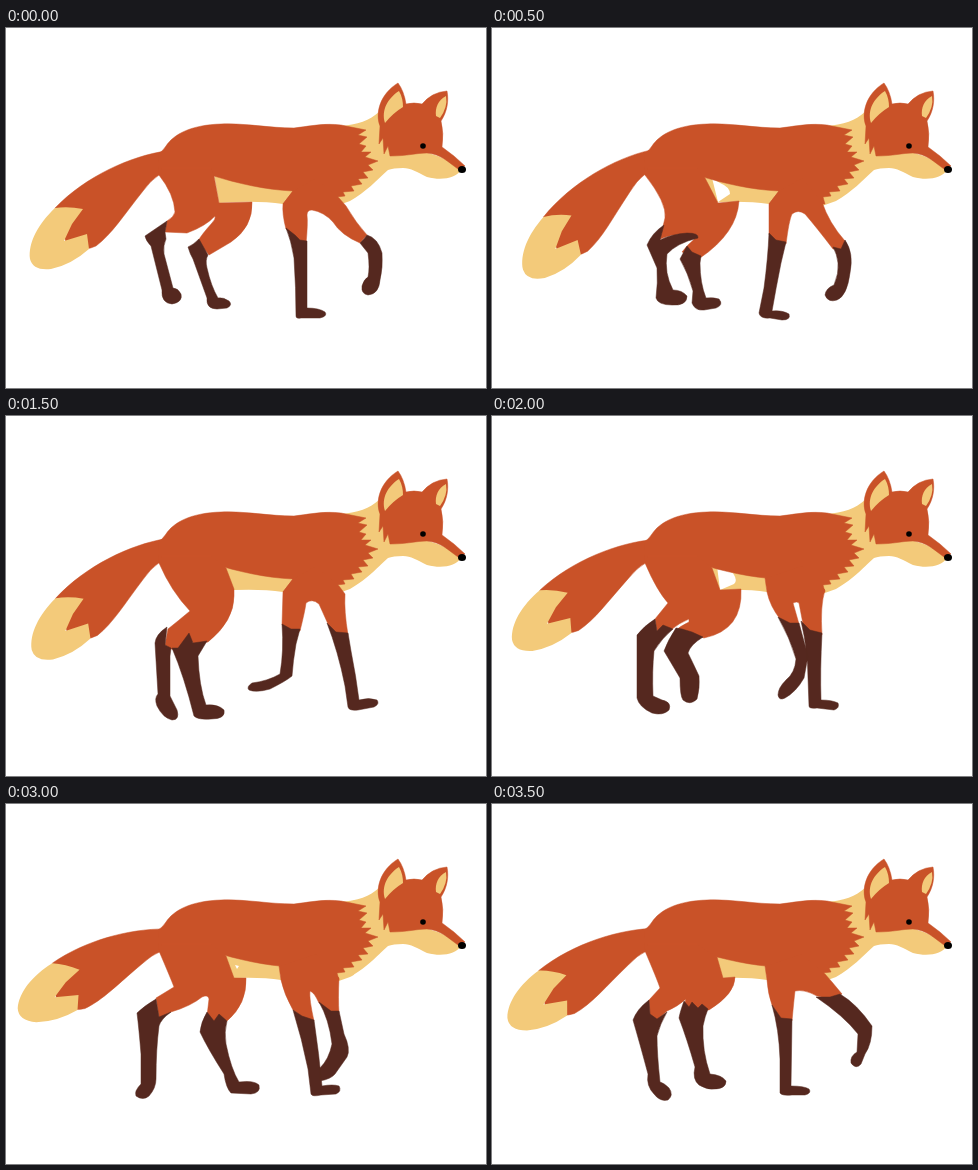
Animation of 480 by 360 pixels, one loop 4000 ms. Source, as an HTML page:

```html
<!DOCTYPE html>
<html lang="en">
<head>
<meta charset="utf-8">
<title>Walking fox</title>
<style>
  html, body { margin: 0; width: 100%; height: 100%; overflow: hidden; background: #fff; }
  svg { display: block; width: 480px; height: 360px; }
  .fur { fill: #c95228; }
  .cream { fill: #f3ca7a; }
  .sock { fill: #55281f; }
  .fur, .sock { stroke-width: .5; stroke-linejoin: round; }
  .fur { stroke: #c95228; }
  .sock { stroke: #55281f; }
</style>
</head>
<body>
<svg viewBox="0 0 480 360">
  <g id="tail">
    <path class="fur" d="M160 123C125 128 80 148 49 180L60 214L78 221Q84 221 90 218C106 206 117 188 137 163Q145 152 153 147L170 140Z"/>
    <path class="cream" d="M49 180C32 196 22 215 24 231Q27 243 45 241Q65 237 83 221L81 206L58 213L66 196L77 181Q62 178 49 180Z"/>
  </g>
  <path class="cream" id="belly"/>
  <path fill="#fff" id="gap"/>
  <path class="cream" d="M333 98C352 97 364 92 373 84L389 126C402 128 412 124 422 125Q442 130 455 142C450 150 436 153 421 149C411 144 405 140 397 140Q387 140 382 142C371 152 360 164 344 173L330 178L325 130Z"/>
  <path class="fur" d="M153 147L152 126Q156 124 160 118C168 106 185 97 215 96C240 95 262 100 288 100C305 98 318 95 335 97L360 102L352 107L361 109L353 116L360 118L355 124L365 124L359 129L372 133L362 137L367 142L357 144L362 150L352 151L356 156L345 158L348 163L337 164L339 168L331 169L333 176L277 176L287 163C260 162 230 155 208 148Z"/>
  <path class="fur" id="rear"/>
  <path class="fur" id="front"/>
  <path class="sock" id="socks"/>
  <path class="fur" d="M374 98C369 85 374 66 392 55Q398 63 400 76Q408 74 416 76Q426 64 441 63C443 73 441 84 435 93Q438 105 436 119Q449 128 459 138L452 141C442 134 435 126 421 125C410 125 402 128 384 128L382 118L378 126L377 110L373 116Z"/>
  <path class="cream" d="M393 63Q397 70 397 79Q387 85 379 95C375 82 382 70 393 63ZM440 68C432 72 429 80 430 88L434 90Q442 79 440 68Z"/>
  <circle cx="417" cy="118" r="2.8"/>
  <ellipse cx="456" cy="141.5" rx="4" ry="3.5"/>
</svg>
<script>
const STEP = 500;

// Belly patch ends behind the elbow in the first half, in front of it in the second
const bellies = [
  "M208 146L287 160V163L277 176Q250 172 213 175Z",
  "M208 146L273 158L275 176Q250 172 213 175Z"
];

const poses = [
  {
    tail: 0, belly: 0,
    rear: "Q168 166 169 184Q168 189 161 193L159 204L181 205Q200 198 209 188Q210 191 206 195Q196 206 192 213L203 227L225 214Q247 199 246 174L213 175L208 148",
    front: "M287 163L277 176Q276 186 280 201L289 209L300 216Q302 195 301 187Q301 182 306 182Q318 184 327 194Q335 207 354 215L361 207Q350 195 340 178L333 170",
    socks: [
      "M161 193L139 208Q140 213 145 218L156 262Q155 275 166 276Q177 274 175 266Q172 260 167 260L158 226Q157 217 160 211L159 204Z",
      "M193 211Q187 217 182 219Q184 226 187 231L201 270Q200 281 211 281L221 280Q227 277 223 273Q217 269 212 270Q205 258 201 240Q199 232 202 227Z",
      "M280 200Q285 212 288 230Q290 260 290 288Q290 291 295 290L314 290Q322 288 319 284Q313 280 301 280L301 213L294 212L289 207Z",
      "M361 207Q372 210 376 225Q377 240 374 252Q373 266 362 267Q355 266 356 258Q358 251 362 249Q364 240 362 225L354 215L358 211Z"
    ]
  },
  {
    tail: -5, belly: 0,
    gap: "M220 150L228 155Q238 159 238 166L226 174Z",
    rear: "Q175 175 173 190L168 211Q185 204 206 208Q195 217 190 224L208 230Q245 205 247 173L226 175L213 150",
    front: "M287 163L277 176L277 207L284 214L294 216Q297 192 300 186Q306 181 313 186Q325 200 341 221L350 221L353 213Q337 195 330 174",
    socks: [
      "M172 197Q160 205 155 217L165 240Q166 255 164 270Q166 277 180 277Q195 278 195 268Q190 262 181 262Q172 245 175 226Q185 215 206 210Q207 205 195 205Q180 206 168 212Z",
      "M195 218L188 231Q196 245 201 263L200 275Q203 283 212 282L224 280Q232 277 227 271Q221 269 214 270Q208 255 208 235L209 228L200 224Z",
      "M277 205Q276 230 272 260L267 285Q268 291 278 290L290 292Q299 292 297 286Q290 282 280 283Q284 260 289 235L294 214L284 212Z",
      "M353 212Q362 225 358 245Q355 268 345 272Q336 275 333 267Q334 260 342 257Q347 245 346 235Q345 226 341 219L349 221Z"
    ]
  },
  {
    tail: -5.5, belly: 0,
    rear: "Q172 175 180 193L167 204L164 220L195 213L188 226L206 228Q238 205 238 173L227 174L217 151",
    front: "M287 163L277 176L277 208L284 214L294 216Q298 193 300 186Q306 181 313 187L331 214L340 220L348 216Q337 195 335 174",
    socks: [
      "M168 203Q156 211 152 222L159 260Q157 276 160 283Q172 291 184 290Q187 282 178 278L170 265Q166 250 169 235Q180 222 196 214L180 212L165 219Z",
      "M184 222L178 232Q190 255 194 285Q198 293 210 292Q226 291 222 283Q214 279 206 279Q200 260 200 238L205 227L192 219Z",
      "M277 207Q277 233 273 258L258 276Q252 282 260 284Q275 284 284 272Q287 250 290 230L294 214L284 212Z",
      "M331 213Q339 235 341 260L337 282Q340 290 350 286Q360 282 356 275Q352 265 353 240L348 215L339 218Z"
    ]
  },
  {
    tail: -1.3, belly: 0,
    rear: "Q165 175 184 195Q172 205 162 213L159 229L165 233L172 234L183 222L188 228L202 226Q228 205 228 180L228 173L220 152",
    front: "M287 163L277 176L276 209L285 215L294 215Q299 195 300 187Q306 182 313 188L322 208L330 218L342 219Q338 195 339 178L333 170",
    socks: [
      "M161 211Q150 218 149 227L152 278Q148 282 151 290Q157 302 166 304Q174 304 171 294L164 280L164 240L165 232L159 229Z",
      "M166 232Q178 260 188 300Q192 304 205 303Q220 303 218 294Q212 288 200 289Q193 270 192 240L201 225L187 227L183 217L172 232Z",
      "M276 208Q278 235 274 258Q262 265 246 267Q240 271 243 274Q250 277 264 273Q280 265 286 260Q287 245 290 228L294 213L285 213Z",
      "M321 207Q332 235 339 270L342 291Q343 295 352 294L368 291Q374 288 371 284Q363 281 353 284Q350 260 345 235L342 217L330 216Z"
    ]
  },
  {
    tail: 3.2, belly: 1,
    gap: "M225 150L241 157Q246 165 242 168L228 174Z",
    rear: "Q165 175 176 187L163 203L165 215L171 211L179 214Q187 207 197 203L197 206Q188 210 182 216L190 215L193 220L200 218L212 222Q251 214 249 173L228 174L220 152",
    front: "M273 162L275 176Q278 190 288 203L298 208L307 208L301 187Q305 185 307 187L311 208L318 218L330 219Q328 190 333 174",
    socks: [
      "M163 203Q152 210 145 219L145 282Q147 291 160 297Q171 300 177 294Q180 286 170 284L161 280Q160 255 162 235Q170 222 181 213L171 209L165 215Z",
      "M184 212Q176 224 172 235Q178 245 188 262Q188 280 191 284Q198 290 205 283Q208 272 207 260Q200 245 196 237Q198 229 211 221L200 216L190 213Z",
      "M286 201Q298 222 304 243Q303 257 294 264Q286 272 286 279Q287 285 293 282Q304 276 312 262L316 240L307 207L298 207Z",
      "M309 205Q316 235 316 262L317 290Q317 293 325 292L342 294Q348 292 346 287Q340 284 329 284Q328 255 330 217L318 214Z"
    ]
  },
  {
    tail: 7.4, belly: 1,
    rear: "Q165 175 172 185L156 199L158 215L165 214L180 208Q190 202 200 198L200 212L208 216L217 220Q244 205 245 173L228 174L220 152",
    front: "M273 162L275 176Q278 190 292 205L298 212L322 217L332 213Q330 195 332 174",
    socks: [
      "M156 199Q145 206 138 214L140 281Q138 290 150 295Q160 298 162 291Q158 285 156 280Q155 250 158 229Q168 214 180 208L165 214Z",
      "M200 209Q188 220 184 232Q194 248 204 265L205 283Q212 291 222 288Q232 285 230 276L222 268Q212 255 209 238Q211 226 217 219L208 214Z",
      "M298 205Q307 235 310 265L311 290Q312 293 322 292L338 292Q343 289 340 285Q332 282 323 283Q321 250 322 216Z",
      "M292 203Q308 225 314 242Q311 256 303 264Q296 272 300 279Q308 283 316 273Q328 262 330 250L331 212L318 213Z"
    ]
  },
  {
    tail: 11.4, belly: 1,
    gap: "M229 161L233 162L231 165Z",
    rear: "Q165 175 168 183L150 194L153 214L165 208Q185 202 196 193Q202 190 203 195L201 212L208 218L213 213L221 217Q241 200 240 174L228 174L220 152",
    front: "M273 162L275 176Q278 190 287 206L296 213L308 217Q303 195 304 187Q308 188 313 199L325 208L333 209Q332 195 333 174",
    socks: [
      "M150 195Q138 202 131 209Q133 225 135 250L135 280Q128 287 130 292Q137 297 143 292Q150 284 150 275Q150 245 153 222Q155 215 165 208L153 213Z",
      "M201 208Q195 218 194 228Q202 245 218 270Q220 284 225 289L245 290Q255 289 253 281Q248 276 233 278Q225 265 220 240Q218 228 221 217L213 210L208 217Z",
      "M287 206Q296 235 302 265L305 290Q306 293 315 291L330 290Q336 287 333 282Q327 280 316 282Q313 250 308 216L296 212Z",
      "M313 198Q323 215 326 240Q323 255 314 264L314 277Q325 275 329 270L341 253Q345 245 338 230L333 207L325 207Z"
    ]
  },
  {
    tail: 7.4, belly: 1,
    rear: "Q165 175 168 184L157 196L158 212L165 216L175 207Q185 203 194 195L192 201L203 206L217 206Q243 190 243 173L231 174L225 153",
    front: "M273 162L275 176Q276 190 280 201L289 215L300 217Q302 195 303 187Q312 185 325 192L339 195L350 190L340 178L333 170",
    socks: [
      "M157 196Q145 205 141 216Q148 240 156 270Q154 282 162 290Q168 298 176 296Q182 291 177 284Q172 279 168 278Q165 250 165 232Q168 220 175 208L165 215L158 210Z",
      "M192 197Q188 208 187 214Q195 235 203 263Q200 275 207 281Q215 286 222 285Q234 285 234 277Q230 271 218 270Q210 247 211 222Q213 212 216 205L210 200L206 204L200 198L197 203Z",
      "M280 201Q287 225 288 255L288 289Q290 292 300 291L313 291Q320 289 317 285Q312 282 299 282L300 215L289 214Z",
      "M348 190Q365 200 380 222Q380 240 373 250L369 260Q364 266 359 259Q358 252 365 248L366 230Q352 212 324 193L338 193Z"
    ]
  }
];

const part = id => document.getElementById(id);
const draw = (id, d) => part(id).setAttribute("d", d);

// Both thighs run up into the body so that no seam shows
function show(pose) {
  part("tail").setAttribute("transform", `rotate(${pose.tail} 152 156)`);
  draw("belly", bellies[pose.belly]);
  draw("gap", pose.gap || "");
  draw("rear", `M153 147${pose.rear}L205 140L156 140Z`);
  draw("front", `${pose.front}L310 150Z`);
  draw("socks", pose.socks.join(""));
}

let shown = 0;
show(poses[0]);
const start = performance.now();

function tick() {
  const elapsed = Math.max(0, performance.now() - start);
  const index = Math.floor(elapsed / STEP) % poses.length;
  if (index !== shown) show(poses[shown = index]);
  requestAnimationFrame(tick);
}
requestAnimationFrame(tick);
</script>
</body>
</html>
```
